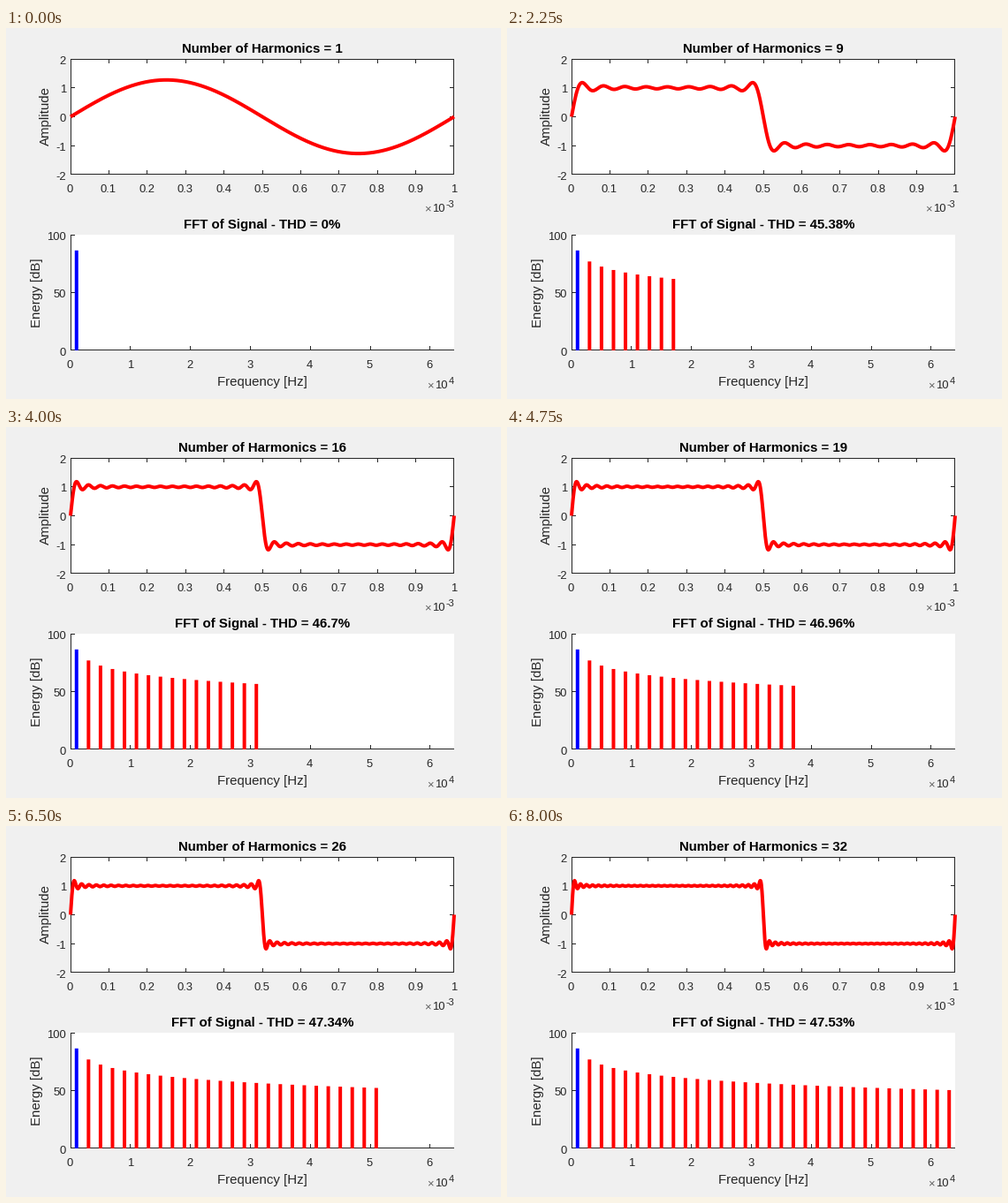
These frames come from a looping animation (560 by 420 pixels, 8250 ms). A matplotlib script:

```python
import numpy as np
import matplotlib.pyplot as plt
from matplotlib.animation import FuncAnimation
from matplotlib.patches import Rectangle

W, H, DPI = 560, 420, 100
PT = 72 / DPI  # points per pixel
LEFT, RIGHT = 73, 507
TOP1, BOT1 = 35.0, 165.9
TOP2, BOT2 = 234.0, 364.9
INK = "#262626"
MAX_N = 32
TICK = 5

plt.rcParams["font.family"] = "Liberation Sans"
fig = plt.figure(figsize=(W / DPI, H / DPI), dpi=DPI, facecolor="#f0f0f0")
ax = fig.add_axes([0, 0, 1, 1])
ax.set_xlim(0, W)
ax.set_ylim(H, 0)
ax.axis("off")


def text(x, y, s, px=13, ha="center", color=INK, **kw):
    return ax.text(x, y, s, fontsize=px * PT, ha=ha, va="baseline",
                   color=color, rotation_mode="anchor", **kw)


def rect(x, y, w, h, color, z, smooth=False):
    box = Rectangle((x, y), w, h, facecolor=color, linewidth=0,
                    antialiased=smooth, snap=not smooth, zorder=z)
    return ax.add_patch(box)


def hline(x0, x1, row):
    rect(x0, row, x1 - x0, 1, INK, 2)


def vline(col, y0, y1):
    rect(col, y0, 1, y1 - y0, INK, 2)


def panel(y0, y1, xticks, yticks, boxed):
    """Draw a plot area; ticks are (fraction, label) pairs."""
    top, bottom = int(y0), int(y1)
    rect(LEFT, top, RIGHT - LEFT, bottom + 1 - top, "white", 1)
    hline(LEFT, RIGHT, bottom)
    vline(LEFT, top, bottom + 1)
    if boxed:
        hline(LEFT, RIGHT, top)
        vline(RIGHT - 1, top, bottom + 1)
    for frac, label in xticks:
        x = LEFT + frac * (RIGHT - LEFT)
        col = min(int(x), RIGHT - 1)
        vline(col, bottom - TICK + 1, bottom)
        if boxed:
            vline(col, top, top + TICK)
        text(x - 0.5, bottom + 20.6, label)
    for frac, label in yticks:
        y = y1 - frac * (y1 - y0)
        hline(LEFT, LEFT + TICK, int(y))
        if boxed:
            hline(RIGHT - TICK, RIGHT, int(y))
        text(67.8, y + 5.7, label, ha="right")


def power(x, y, exponent):
    text(x - 9, y, "×", ha="left", color="#606060")
    text(x, y, "10", ha="left")
    text(507, y - 5, exponent, px=11, ha="right")


panel(TOP1, BOT1,
      [(i / 10, f"{i / 10:g}") for i in range(11)],
      [((v + 2) / 4, str(v)) for v in range(-2, 3)], True)
panel(TOP2, BOT2,
      [(i / 6.4, str(i)) for i in range(7)],
      [(v / 100, str(v)) for v in (0, 50, 100)], False)
power(482, 208, "-3")
power(485, 408, "4")
text(49, 99.8, "Amplitude", px=15, rotation=90)
text(39, 299.4, "Energy [dB]", px=15, rotation=90)
text(290, 405, "Frequency [Hz]", px=15)

wave_title = text(290, 28, "", px=15, color="black", weight="bold")
fft_title = text(290, 227, "", px=15, color="black", weight="bold")

phase = np.linspace(0, 1, 2001)
wave, = ax.plot([], [], color="red", linewidth=4 * PT, zorder=4,
                solid_capstyle="butt", solid_joinstyle="round")

bars = []
for k in range(MAX_N):
    order = 2 * k + 1
    level = 20 * np.log10(4 / np.pi * 16384 / order)
    x = LEFT + order / 64 * (RIGHT - LEFT)
    top = BOT2 - level / 100 * (BOT2 - TOP2)
    bars.append(rect(x - 2, top, 4, BOT2 - top,
                     "red" if k else "blue", 3, smooth=True))


def draw(i):
    n = max(1, i)
    orders = 2 * np.arange(n) + 1
    signal = sum(4 / np.pi * np.sin(2 * np.pi * m * phase) / m for m in orders)
    wave.set_data(LEFT + phase * (RIGHT - LEFT),
                  (TOP1 + BOT1) / 2 - signal * (BOT1 - TOP1) / 4)
    for k, bar in enumerate(bars):
        bar.set_visible(k < n)
    thd = 100 * np.sqrt(np.sum(1 / orders[1:] ** 2))
    wave_title.set_text(f"Number of Harmonics = {n}")
    fft_title.set_text(f"FFT of Signal - THD = {round(thd, 2):g}%")
    return [wave, wave_title, fft_title, *bars]


anim = FuncAnimation(fig, draw, frames=MAX_N + 1, init_func=lambda: draw(0),
                     interval=250, repeat=True, repeat_delay=0)
plt.show()
```
